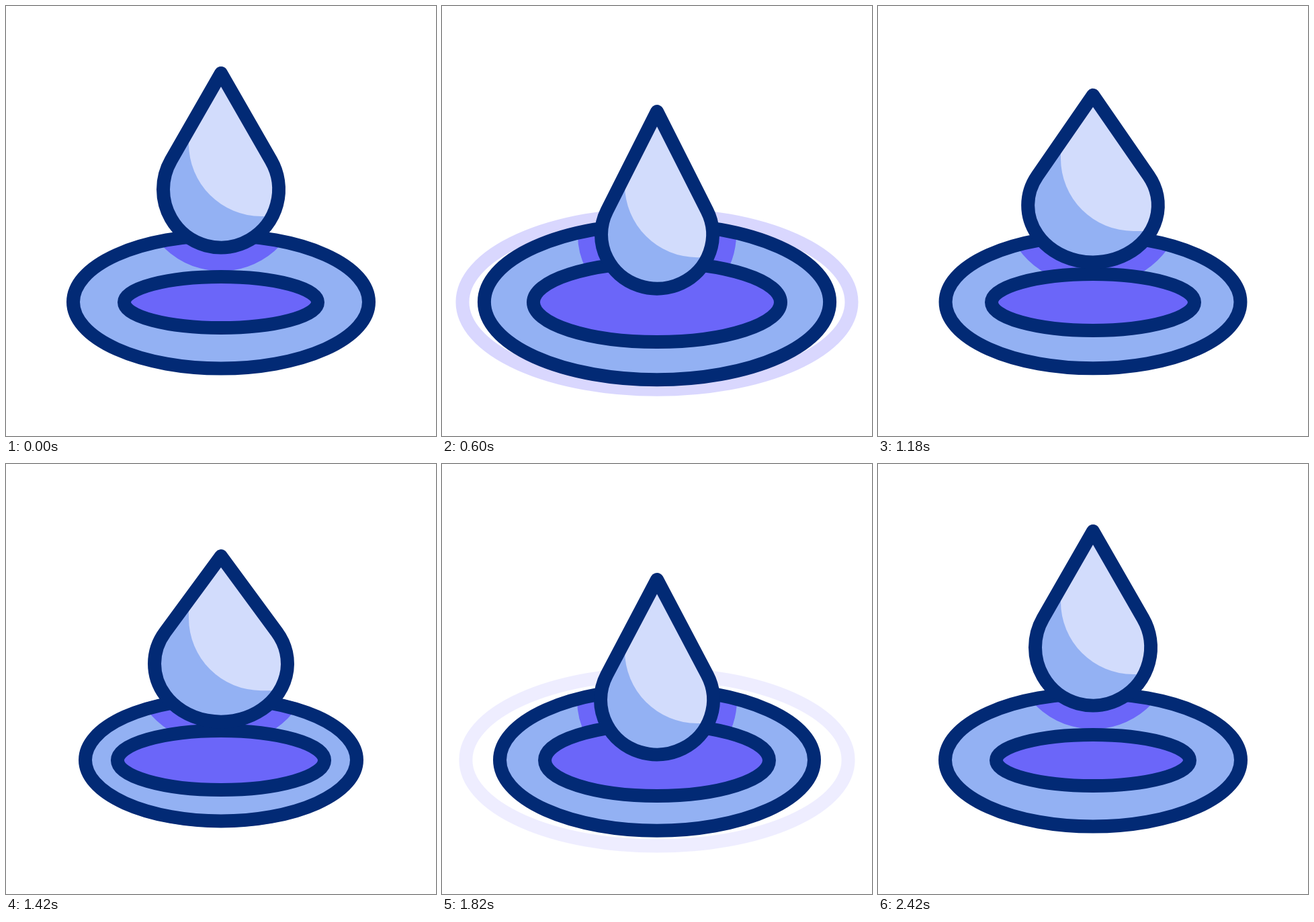
These frames come from a looping animation (640 by 640 pixels, 3000 ms). An HTML page with a canvas:

```html
<!DOCTYPE html>
<html lang="en">
<head>
<meta charset="utf-8">
<title>Water drop</title>
<style>
  html, body { margin: 0; width: 100%; height: 100%; overflow: hidden; background: #fff; }
  canvas { display: block; width: 100vw; height: 100vh; }
</style>
</head>
<body>
<canvas id="stage" width="640" height="640"></canvas>
<script>
const ctx = document.getElementById('stage').getContext('2d');
const LOOP = 3000, CX = 320, POOL_Y = 440.5, LINE = 20;
const NAVY = '#022a75', BLUE = '#93b1f3', PALE = '#d2dcfc', VIOLET = '#6b66f9';

// time, fall, tip y, belly y, belly radius, pool radius, hollow rx, hollow ry
const POSES = [
  [220,   0, 100,   273, 86,   220, 144, 38],
  [600,  61, 157,   340, 83,   257, 184, 59],
  [790,  82, 176,   364, 82,   277, 181, 57],
  [980,  61, 157,   341, 84.5, 253, 161, 47],
  [1290, 11, 126.5, 284, 101,  207, 149, 41],
  [1420, 24, 137,   297, 99,   202, 154, 44],
  [1640, 61, 166,   338, 93,   218, 170, 55.5],
  [1820, 73, 172,   351, 84,   234, 167, 53],
  [2040, 47, 142,   329, 83,   230, 150, 41.5],
  [2420,  0, 100,   273, 86,   220, 144, 38]
];

const RIPPLES = [
  { start: 220, end: 735, from: 220, to: 314 },
  { start: 1330, end: 1885, from: 182, to: 298 }
];

// Monotone cubic: rests at every turning point and never overshoots.
function track(column, t) {
  const last = POSES.length - 1;
  if (t <= POSES[0][0]) return POSES[0][column];
  if (t >= POSES[last][0]) return POSES[last][column];
  const i = POSES.findIndex(p => p[0] > t) - 1;
  const chord = k => k < 0 || k >= last ? 0 :
    (POSES[k + 1][column] - POSES[k][column]) / (POSES[k + 1][0] - POSES[k][0]);
  const slope = k => {
    const a = chord(k - 1), b = chord(k);
    return a * b > 0 ? 2 * a * b / (a + b) : 0;
  };
  const span = POSES[i + 1][0] - POSES[i][0];
  const u = (t - POSES[i][0]) / span, v = 1 - u;
  return POSES[i][column] * v * v * (1 + 2 * u) + POSES[i + 1][column] * u * u * (3 - 2 * u)
    + span * u * v * (v * slope(i) - u * slope(i + 1));
}

function ellipse(rx, ry, y = POOL_Y) {
  const path = new Path2D();
  path.ellipse(CX, y, rx, ry, 0, 0, Math.PI * 2);
  return path;
}

const pool = rx => ellipse(rx, rx * 0.45);

// Two straight sides tangent to an elliptical belly.
function dropShape(tip, belly, rx, bottom) {
  const ry = bottom - belly;
  const angle = Math.asin(ry / (belly - tip));
  const path = new Path2D();
  path.moveTo(CX, tip);
  path.ellipse(CX, belly, rx, ry, 0, -angle, Math.PI + angle);
  path.closePath();
  return path;
}

function fill(path, color) {
  ctx.fillStyle = color;
  ctx.fill(path);
}

function stroke(path, color, width = LINE) {
  ctx.strokeStyle = color;
  ctx.lineWidth = width;
  ctx.stroke(path);
}

function clipped(path, paint) {
  ctx.save();
  ctx.clip(path);
  paint();
  ctx.restore();
}

function highlight(fall) {
  const path = new Path2D();
  path.moveTo(272, 0);
  path.lineTo(272, 205 + fall);
  path.arc(380, 205 + fall, 108, Math.PI, Math.PI / 2, true);
  path.lineTo(640, 313 + fall);
  path.lineTo(640, 0);
  path.closePath();
  return path;
}

function drawRipple({ start, end, from, to }, t) {
  const u = (t - start) / (end - start);
  if (u <= 0 || u >= 1) return;
  ctx.globalAlpha = 1 - u;
  stroke(pool(from + (to - from) * u), VIOLET);
  ctx.globalAlpha = 1;
}

function draw(t) {
  const [fall, tip, belly, radius, poolRadius, hollowX, hollowY] =
    [1, 2, 3, 4, 5, 6, 7].map(column => track(column, t));
  const drop = dropShape(tip, belly, radius, 359.5 + fall);
  const water = pool(poolRadius), hollow = ellipse(hollowX, hollowY, 441);

  ctx.fillStyle = '#fff';
  ctx.fillRect(0, 0, 640, 640);
  ctx.lineJoin = 'round';
  RIPPLES.forEach(ripple => drawRipple(ripple, t));

  fill(water, BLUE);
  clipped(water, () => stroke(drop, VIOLET, 70));
  stroke(water, NAVY);
  fill(hollow, VIOLET);
  stroke(hollow, NAVY);

  fill(drop, BLUE);
  clipped(drop, () => fill(highlight(fall), PALE));
  stroke(drop, NAVY);
}

const origin = performance.now();
function frame() {
  draw((performance.now() - origin) % LOOP);
  requestAnimationFrame(frame);
}
frame();
</script>
</body>
</html>
```
